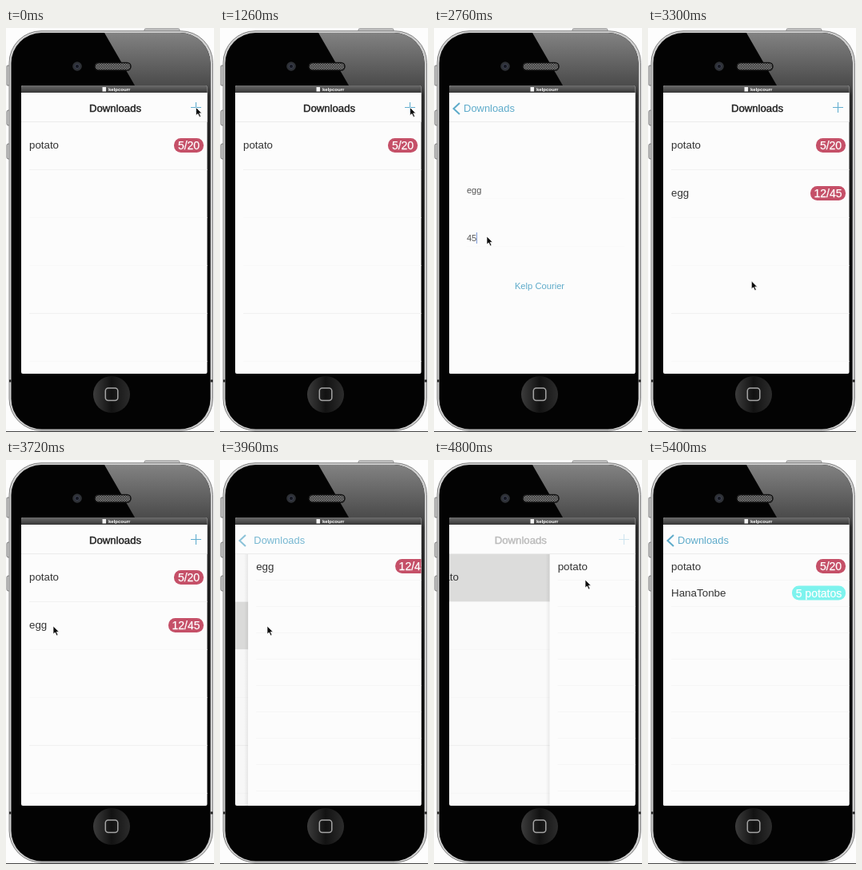
These frames come from a looping animation (260x506 px, 5460 ms). An HTML page:

```html
<!DOCTYPE html>
<html lang="en">
<head>
<meta charset="utf-8">
<title>Downloads</title>
<style>
html, body { margin: 0; width: 100%; height: 100%; overflow: hidden; background: #fdfdfd; }
svg { display: block; width: 260px; height: 506px; }
text { font-family: "Liberation Sans", Arial, sans-serif; fill: #333; }
.row { font-size: 13.3px; }
.cell { font-size: 13.4px; }
.field { font-size: 11px; fill: #555; }
.title { font-size: 13.2px; fill: #222; stroke: #222; stroke-width: .45; }
.blue { fill: #5eabca; }
.badge { font-size: 14px; fill: #fff; stroke: #fff; stroke-width: .25; }
</style>
</head>
<body>
<svg id="stage" viewBox="0 0 260 506">
  <defs>
    <linearGradient id="gloss" gradientUnits="userSpaceOnUse" x1="0" x2="0" y1="6" y2="400">
      <stop offset="0" stop-color="#828282"/><stop offset=".17" stop-color="#4a4a4a"/>
      <stop offset=".2" stop-color="#2c2c2c"/><stop offset="1" stop-color="#111" stop-opacity="0"/>
    </linearGradient>
    <linearGradient id="bar" x1="0" x2="0" y1="0" y2="1">
      <stop offset="0" stop-color="#6c6c6c"/><stop offset="1" stop-color="#363636"/>
    </linearGradient>
    <linearGradient id="key" x1="0" x2="1" y1="0" y2="0">
      <stop offset="0" stop-color="#3c3c3c"/><stop offset=".5" stop-color="#121212"/>
      <stop offset="1" stop-color="#2c2c2c"/>
    </linearGradient>
    <linearGradient id="shade" x1="0" x2="1" y1="0" y2="0">
      <stop offset="0" stop-color="#000" stop-opacity="0"/><stop offset="1" stop-color="#000" stop-opacity=".07"/>
    </linearGradient>
    <pattern id="mesh" width="3" height="3" patternUnits="userSpaceOnUse">
      <rect width="3" height="3" fill="#3a3a3a"/><circle cx="1" cy="1" r=".8" fill="#a5a5a5"/>
      <circle cx="2.5" cy="2.5" r=".7" fill="#888"/>
    </pattern>
    <clipPath id="face"><rect x="6.5" y="6" width="249" height="496.5" rx="38"/></clipPath>
    <clipPath id="screen"><rect x="19" y="72" width="232.5" height="361" rx="2"/></clipPath>
  </defs>

  <g id="phone">
    <rect x="173" y=".8" width="44" height="6" rx="1.5" fill="#c4c4c4" stroke="#888" stroke-width=".8"/>
    <g fill="#c8c8c8" stroke="#666" stroke-width=".8">
      <rect x="1" y="47" width="4" height="25" rx="1"/>
      <rect x="1" y="103" width="5" height="19" rx="2"/>
      <rect x="1" y="145" width="5" height="19" rx="2"/>
    </g>
    <rect x="4" y="3.7" width="254.5" height="500.5" rx="40" fill="#cfcfcf" stroke="#777" stroke-width=".9"/>
    <rect x="6.5" y="6" width="249" height="496.5" rx="38" fill="#030303"/>
    <path d="M123 6 161 72 251 72 251 400 260 400 260 6Z" fill="url(#gloss)" clip-path="url(#face)"/>
    <path d="M4 442h2.5M255.5 442h3" stroke="#222" stroke-width="3"/>
    <path d="M0 505.5h260" stroke="#444"/>
    <circle cx="89" cy="48" r="5.8" fill="#2e3136"/>
    <circle cx="89" cy="48" r="2.6" fill="#14161f" stroke="#454a5c" stroke-width=".8"/>
    <rect x="111" y="43.5" width="45" height="9.5" rx="4.7" fill="url(#mesh)" stroke="#111" stroke-width="1.5"/>
    <circle cx="132" cy="459" r="23" fill="url(#key)"/>
    <rect x="124.3" y="451" width="15.5" height="15.5" rx="3.5" fill="none" stroke="#a5a5a5" stroke-width="1.5"/>
  </g>

  <g clip-path="url(#screen)">
    <rect x="19" y="72" width="233" height="361" fill="#fcfcfc"/>
    <g id="list"></g>
    <rect id="dim" x="19" y="117" width="233" height="316"/>
    <g id="page">
      <rect x="14" y="117" width="5" height="316" fill="url(#shade)"/>
      <rect x="19" y="117" width="233" height="316" fill="#fcfcfc"/>
      <g id="form">
        <path d="M41 213.5H238M41 273.5H238" stroke="#f9f9f9"/>
        <text id="name" class="field" x="41" y="207"></text>
        <text id="count" class="field" x="41" y="267"></text>
        <path id="caret" d="M53.5 256v14" stroke="#7f9bd8"/>
        <text id="send" class="blue" x="132" y="327" font-size="11.2" text-anchor="middle">Kelp Courier</text>
      </g>
      <g id="detail"></g>
    </g>
    <rect x="19" y="81" width="233" height="36" fill="#fcfcfc"/>
    <path d="M19 117.5H252" stroke="#ebebeb"/>
    <text id="title" class="title" y="105" text-anchor="middle">Downloads</text>
    <text id="label" class="blue" y="105" font-size="12.9" text-anchor="middle">Downloads</text>
    <path id="chevron" d="M32 94 24.5 101 32 108" fill="none" stroke="#5eabca" stroke-width="2"/>
    <path id="plus" d="M231 99.5H244M237.5 93V106" stroke="#63aed0" stroke-width="1.1"/>
    <rect x="19" y="72" width="233" height="9" fill="url(#bar)"/>
    <rect x="120.5" y="74" width="4.5" height="5.5" fill="#f4f4f4"/>
    <text x="128" y="79" font-size="6" font-weight="bold" style="fill:#fff">kelpcourr</text>
  </g>
  <path id="mouse" d="M0 0V10L2.4 8 4.3 12 6 11.2 4.2 7.3H7.3Z" fill="#0a0a0a" stroke="#fff" stroke-width=".7"/>
</svg>
<script>
const LOOP = 5460, WIDTH = 232;
const $ = id => document.getElementById(id);
const RED = '#c55068', CYAN = '#7df3ee';

const line = (y, x, color) => `<path d="M${x} ${y}.5H252" stroke="${color}"/>`;
const text = (s, y, cls) => `<text class="${cls}" x="29" y="${y}">${s}</text>`;
const badge = (s, y, w, color) =>
  `<rect x="${247 - w}" y="${y - 9}" width="${w}" height="18" rx="8.5" fill="${color}"/>` +
  `<text class="badge" x="${247 - w / 2}" y="${y + 5}" text-anchor="middle">${s}</text>`;

function buildList() {
  let s = '<rect id="picked" x="19" width="233" height="60" fill="#dededd"/>';
  for (let i = 1; i <= 5; i++) s += line(117 + 60 * i, 29, i % 3 === 1 ? '#f1f1f1' : '#f8f8f8');
  s += text('potato', 151, 'row') + badge('5/20', 147, 37, RED);
  s += `<g id="added">${text('egg', 211, 'row')}${badge('12/45', 207, 44, RED)}</g>`;
  $('list').innerHTML = s;
}

function detailRows(name, count, w) {
  let s = '';
  for (let i = 1; i <= 9; i++) s += line(117 + 33 * i, 29, '#f6f6f6');
  return s + text(name, 137.5, 'cell') + badge(count, 133, w, RED) +
    `<g id="peer">${text('HanaTonbe', 170.5, 'cell')}${badge('5 potatos', 166.5, 67, CYAN)}</g>`;
}

// start time, direction, page shown
const moves = [
  [2370, 1, 'form'], [3060, -1, 'form'],
  [3810, 1, 'egg'], [4353, -1, 'egg'],
  [4716, 1, 'potato']
];
const SLIDE = 180;

// time, x, y of the pointer
const path = [
  [0, 237.5, 99.5], [2420, 237.5, 99.5], [2550, 66, 201], [2610, 66, 201], [2690, 66, 261],
  [2860, 66, 261], [2970, 132, 321], [3270, 132, 321], [3540, 59, 208], [4020, 59, 208],
  [4260, 95, 100], [4500, 95, 100], [4660, 189, 150], [4960, 189, 150], [5320, 165, 508]
];

const clamp = v => Math.max(0, Math.min(1, v));
const ease = v => v * v * (3 - 2 * v);
const during = (t, a, b) => t >= a && t < b;
const fade = (id, v) => $(id).setAttribute('opacity', clamp(v).toFixed(3));
const show = (id, on) => $(id).setAttribute('display', on ? 'inline' : 'none');
const shift = (id, x, y = 0) => $(id).setAttribute('transform', `translate(${x.toFixed(2)} ${y.toFixed(2)})`);
const typed = (s, t, start, gap) => s.slice(0, Math.max(0, Math.floor((t - start) / gap) + 1));

function pointer(t) {
  const i = path.findIndex(k => k[0] > t);
  if (i < 0) return path[path.length - 1].slice(1);
  const [a, x, y] = path[i - 1], [b, u, v] = path[i];
  const k = ease((t - a) / (b - a));
  return [x + (u - x) * k, y + (v - y) * k];
}

let shown = '';
function setPage(kind) {
  if (kind === shown) return;
  shown = kind;
  show('form', kind === 'form');
  show('detail', kind !== 'form');
  if (kind === 'egg') $('detail').innerHTML = detailRows('egg', '12/45', 44);
  if (kind === 'potato') $('detail').innerHTML = detailRows('potato', '5/20', 37);
}

function draw(t) {
  const move = moves.filter(m => m[0] <= t).pop();
  let p = 0, n = 0;
  if (move) {
    const [start, dir, kind] = move;
    const k = ease(clamp((t - start) / SLIDE));
    p = dir > 0 ? k : 1 - k;
    n = p ** (dir > 0 ? 1.12 : 0.8);
    setPage(kind);
    // the second row loads once the page has arrived
    if (kind !== 'form') show('peer', dir < 0 || t > start + SLIDE + 60);
  }
  show('page', p > 0);
  shift('page', WIDTH * (1 - p));
  shift('list', -0.33 * WIDTH * p);
  fade('dim', 0.02 * p);

  const x = 136.5 - 67.5 * n, back = clamp(2 * n - 1), front = 1 - 1.7 * n;
  $('title').setAttribute('x', x);
  $('label').setAttribute('x', x);
  fade('title', front);
  fade('label', back * (during(t, 4300, 4353) ? 0.4 : 1));
  fade('chevron', back * back);
  fade('plus', front * (during(t, 2280, 2370) ? 0.5 : 1));

  const egg = during(t, 3780, 4100), potato = t >= 4690;
  show('picked', egg || potato);
  $('picked').setAttribute('y', egg ? 177 : 117);
  show('added', t >= 3060);

  $('name').textContent = typed('egg', t, 2580, 30);
  $('count').textContent = typed('45', t, 2700, 40);
  show('caret', during(t, 2740, 3000));
  fade('send', during(t, 2990, 3060) ? 0.4 : 1);

  shift('mouse', ...pointer(t));
  show('mouse', t < 5340);
}

buildList();
const begin = performance.now();
function tick() {
  draw((performance.now() - begin) % LOOP);
  requestAnimationFrame(tick);
}
draw(0);
requestAnimationFrame(tick);
</script>
</body>
</html>
```
